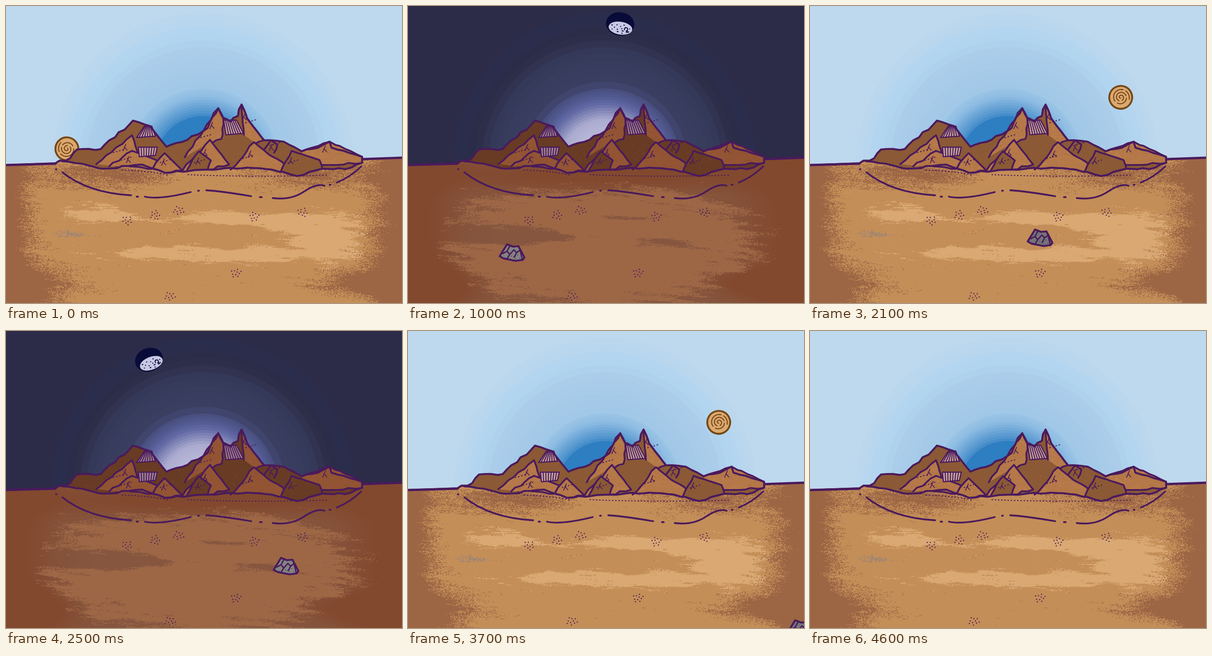
Recreate the animation shown at these times as an HTML page with a canvas. Size 864 by 648 pixels, loop 4.7 s.

```html
<!DOCTYPE html>
<html lang="en">
<head>
<meta charset="utf-8">
<title>Desert days</title>
<style>
html, body { margin: 0; width: 100%; height: 100%; overflow: hidden; background: #bed8ee; }
canvas { display: block; width: 864px; height: 648px; }
</style>
</head>
<body>
<canvas id="stage" width="864" height="648"></canvas>
<script>
const W = 864, H = 648, TAU = Math.PI * 2;
const INK = '#4a1a5c';
const ctx = document.getElementById('stage').getContext('2d');

// Skyline and foot of the range, as key points
const SKYLINE = '108 343 140 332 155 313 207 312 277 250 314 262 350 307 396 292 440 266 463 223 474 244 490 252 506 240 514 215 526 245 563 293 606 296 645 317 690 304 706 296 710 309 777 329';
const FOOT = '777 342 740 356 690 355 635 371 580 357 515 354 440 357 347 364 297 346 212 355 165 344 123 339';

// Faces from back to front; the second point of each is its peak
const LIT = [
  '390 330 463 223 474 245 470 290 440 300',
  '519 281 514 215 526 245 563 293 545 300',
  '645 317 706 296 777 329 777 342 690 347 650 330',
  '197 345 275 282 291 330 240 350',
  '225 350 275 316 330 337 320 355 270 350',
  '320 355 346 321 385 359 347 364',
  '385 359 445 292 487 346 440 357',
  '490 357 541 297 575 325 602 340 635 371 580 357 515 354'
];
const SHADED = ['395 358 421 317 447 337 440 357', '600 360 623 316 684 336 690 355 635 371', '564 312 578 293 592 302 585 320'];

// Pale cliffs: top left, top right, top y, bottom left, bottom right, bottom y
const CLIFFS = [[302, 318, 262, 285, 326, 287], [289, 330, 308, 291, 326, 329], [475, 503, 249, 480, 518, 281]];

const LOOK = {
  day: {
    bands: [[345, 0xbed8ee], [284, 0xb1d4ef], [253, 0xabcdea], [175, 0xa1c8e7], [150, 0x8dbbe2], [112, 0x4a90cb], [105, 0x2e7ec2]],
    low: 0x9c6645, mid: 0xc48e58, high: 0xd9a873,
    face: '#b57848', shade: '#8b5935', cliff: '#c7a59a', flecks: ['#ca955f', '#9b633d'], rock: '#757478',
    edge: 55,
    light: [[200, 455, 85, 22], [330, 538, 150, 15], [540, 545, 110, 16], [480, 462, 120, 16], [700, 520, 85, 42], [660, 470, 120, 22]]
  },
  night: {
    bands: [[345, 0x2c2b48], [322, 0x2b2e4e], [292, 0x2b2b46], [252, 0x363a5a], [190, 0x3a3e61], [150, 0x525a92], [135, 0x6269a4], [100, 0xaaabcf], [35, 0xc6c6e2]],
    low: 0x82492f, mid: 0x86563f, high: 0x9d6746,
    face: '#925433', shade: '#683b25', cliff: '#9e8190', flecks: ['#9b603c', '#7e472e'], rock: '#838381',
    edge: 100,
    light: [[430, 520, 340, 125, 1.25], [270, 500, 150, 20, -1.2], [550, 518, 90, 18, -1], [460, 462, 100, 9, -.7]]
  }
};

const rgb = hex => [hex >> 16, hex >> 8 & 255, hex & 255];
const lerp = (a, b, k) => a + (b - a) * k;
const mix = (a, b, k) => a.map((v, i) => lerp(v, b[i], k));
const bell = v => Math.exp(-v * v);

function hash(x, y) {
  let h = Math.imul(x, 374761393) ^ Math.imul(y, 668265263);
  h = Math.imul(h ^ (h >>> 13), 1274126177);
  return ((h ^ (h >>> 16)) >>> 0) / 4294967296;
}

function noise(x, y) {
  const ix = Math.floor(x), iy = Math.floor(y);
  const ease = v => v * v * (3 - 2 * v);
  const u = ease(x - ix);
  const row = j => lerp(hash(ix, j), hash(ix + 1, j), u);
  return lerp(row(iy), row(iy + 1), ease(y - iy));
}

function layer() {
  const c = document.createElement('canvas');
  c.width = W;
  c.height = H;
  return [c, c.getContext('2d')];
}

function line(g, path, width, color = INK) {
  g.lineWidth = width;
  g.strokeStyle = color;
  g.stroke(new Path2D(path));
}

function disc(g, x, y, rx, ry, color) {
  g.fillStyle = color;
  g.beginPath();
  g.ellipse(x, y, rx, ry, 0, 0, TAU);
  g.fill();
}

function points(text) {
  const n = text.split(' ').map(Number);
  return n.filter((_, i) => i % 2 === 0).map((x, i) => [x, n[i * 2 + 1]]);
}

// Joins key points with a slightly uneven, hand-drawn line
function rough(text) {
  const pts = points(text);
  let path = `${pts[0]}`;
  for (let i = 1; i < pts.length; i++) {
    const [x0, y0] = pts[i - 1], [x1, y1] = pts[i];
    const steps = Math.ceil(Math.hypot(x1 - x0, y1 - y0) / 15);
    for (let s = 1; s <= steps; s++) {
      const k = s / steps, x = lerp(x0, x1, k), y = lerp(y0, y1, k);
      const sway = s < steps ? (hash(x | 0, y | 0) - .5) * 4 : 0;
      path += ` ${x + sway} ${y + sway}`;
    }
  }
  return path;
}

function makeSky({ bands }) {
  const [c, g] = layer();
  g.fillStyle = `rgb(${rgb(bands[0][1])})`;
  g.fillRect(0, 0, W, H);
  for (let r = 345; r > 30; r -= r > 165 ? 15 : 6) {
    const i = bands.findIndex(b => b[0] < r);
    const [r0, c0] = bands[Math.max(0, i - 1)], [r1, c1] = bands.at(i);
    const color = i < 0 ? rgb(c1) : mix(rgb(c0), rgb(c1), (r0 - r) / (r0 - r1));
    disc(g, 430, 345, r, r, `rgb(${color.map(Math.round)})`);
  }
  return c;
}

// Dark soil gathers at the sides, in the low corners and below the range
function darkness(x, y, edge, night) {
  const sides = bell(x / edge) + bell((W - x) / edge / 1.3);
  const corners = bell((x - 40) / 115) * bell((y - 612) / 45) + bell((x - 790) / 125) * bell((y - 605) / 28);
  const patches = night ? 1 : .5 + .5 * Math.cos((x - 195) / 490 * TAU);
  return sides + corners + patches * bell((y - 368) / 34) * bell((x - 432) / 420);
}

function lightness(blobs, x, y) {
  return blobs.reduce((sum, [bx, by, rx, ry, w = 1]) => sum + w * bell((x - bx) / rx) * bell((y - by) / ry), 0);
}

function makeSoil(look, night) {
  const [c, g] = layer();
  const img = g.createImageData(W, H);
  const low = rgb(look.low), mid = rgb(look.mid), high = rgb(look.high), gray = [146, 130, 124];
  for (let y = 315; y < H; y++) {
    for (let x = 0; x < W; x++) {
      const streak = noise(x / 75 + y / 60, y / 8 - x / 70) * .6 + noise(x / 17, y / 2.4) * .4 - .5;
      const grain = hash(x >> 1, y + 977) - .5;
      const d = darkness(x, y, look.edge, night), l = lightness(look.light, x, y);
      let color = mid;
      if (night) {
        color = l - d * .4 + streak * .75 + grain * .3 > .36 ? high : mix(mid, low, Math.min(1, d * 1.2));
      } else if (d + streak * .6 + grain * .65 > .5) color = low;
      else if (l + streak * 1.1 + grain * .25 > .53) color = high;
      const speck = bell((x - 138) / 45) * bell((y - 497) / 9);
      if (!night && speck * .6 + streak * .6 + grain * .7 > .6) color = gray;
      img.data.set([...color, 255], (y * W + x) * 4);
    }
  }
  g.putImageData(img, 0, 0);
  return c;
}

// Fills a rock face and scatters short horizontal flecks over it
function face(g, path, color, flecks) {
  const p = new Path2D(path);
  g.fillStyle = color;
  g.fill(p);
  g.save();
  g.clip(p);
  g.globalAlpha = .45;
  for (let i = 0; i < 2400; i++) {
    const x = 110 + hash(i, 1) * 670, y = 215 + hash(i, 2) * 157;
    g.fillStyle = flecks[noise(x / 45, y / 14) > .47 ? 0 : 1];
    g.fillRect(x, y, 1 + hash(i, 3) * 5, 1);
  }
  g.restore();
}

function peak(g, text, color, flecks) {
  const path = `M${rough(text)}`;
  face(g, path + 'Z', color, flecks);
  line(g, path, 3.8);
  const [[lx, ly], [ax, ay]] = points(text);
  const x = lerp(ax, lx, .25), y = lerp(ay, ly, .25);
  line(g, `M${x + 6} ${y + 4}l-6 14M${x + 3} ${y + 10}l6 7`, 1.8);
  g.setLineDash([1.5, 5.5]);
  line(g, `M${lerp(ax, lx, .6) + 6} ${lerp(ay, ly, .6)}l24 -7`, 2.1);
  g.setLineDash([]);
}

function cliff(g, [tl, tr, ty, bl, br, by], color) {
  const shape = `M${tl} ${ty}L${tr} ${ty} ${br} ${by - 3} ${bl} ${by}Z`;
  g.fillStyle = color;
  g.fill(new Path2D(shape));
  line(g, shape, 2.6);
  for (let k = 1 / 7; k < .99; k += 1 / 7) {
    line(g, `M${lerp(tl, tr, k)} ${ty}L${lerp(bl, br, k)} ${by - 2}`, 2.2);
  }
}

function makeLand(look, night) {
  const [c, g] = layer();
  const skyline = rough(SKYLINE), foot = rough(FOOT);
  g.lineCap = g.lineJoin = 'round';
  g.save();
  g.clip(new Path2D(`M0 347L${skyline} 779 334 864 331 864 648 0 648Z`));
  g.drawImage(makeSoil(look, night), 0, 0);
  g.restore();

  face(g, `M${skyline}L${foot}Z`, look.shade, [look.shade, look.flecks[1]]);
  for (const p of LIT) peak(g, p, look.face, look.flecks);
  for (const p of SHADED) peak(g, p, look.shade, [look.shade, look.flecks[1]]);
  for (const p of CLIFFS) cliff(g, p, look.cliff);

  line(g, `M0 347L${skyline} L${foot}`, 4.2);
  line(g, 'M0 347L108 344M779 334L864 331', 5);
  line(g, 'M123 363Q180 408 273 413M303 416Q335 423 403 406M437 402Q470 404 535 415M582 419Q622 424 650 405T695 392M722 385Q750 374 775 350', 3.8);
  line(g, 'M109 356h1M285 416h3M419 403h2M554 417h4M706 390h2', 3.8);
  g.setLineDash([1.5, 5.5]);
  line(g, 'M253 358Q305 359 355 369M397 368Q540 374 703 369', 2.1);
  g.setLineDash([]);

  for (const [x, y] of points('265 468 325 456 377 446 542 460 648 450 502 582 358 633')) {
    for (let i = 0; i < 10; i++) {
      const a = i * 2.4 + x, r = 3.9 * Math.sqrt(i + .6);
      disc(g, x + Math.cos(a) * r, y + Math.sin(a) * r * .85, 1.3, 1.3, INK);
    }
  }
  return c;
}

// Moves the context to the tilted arc followed by both sun and moon
function orbit(degrees, rx, ry) {
  const a = degrees * Math.PI / 180, x = rx * Math.sin(a);
  ctx.translate(418 + x, 338 - ry * Math.cos(a) - .05 * x);
  ctx.rotate(a);
}

function drawSun(step) {
  ctx.save();
  orbit(-82 + 29.3 * step, 288, 292);
  disc(ctx, 0, 0, 25, 25, '#dba870');
  ctx.strokeStyle = '#754713';
  ctx.lineWidth = 4;
  ctx.stroke();
  ctx.lineWidth = 2.2;
  ctx.setLineDash([28, 5, 42, 4]);
  ctx.beginPath();
  for (let t = 0; t < 18; t += .2) ctx.lineTo(Math.cos(t) * (1 + t), Math.sin(t) * (1 + t));
  ctx.stroke();
  ctx.restore();
}

function drawMoon(step) {
  const dark = '#090b38';
  ctx.save();
  orbit(-79.3 + 29.3 * step, 300, 300);
  disc(ctx, 0, 0, 31, 25.5, dark);
  disc(ctx, 2, 9, 26, 14, '#c7c8e5');
  for (let i = 0; i < 14; i++) {
    const t = i * 2.4, r = Math.sqrt((i + .5) / 14);
    disc(ctx, 1 + Math.cos(t) * r * 22, 10 + Math.sin(t) * r * 11, 1 + hash(i, 5) * 1.5, 1.2, dark);
  }
  line(ctx, 'M12 12a3.5 3.5 0 1 1 5 0Q13 19 22 14', 2, dark);
  ctx.restore();
}

// Rock waypoints: tick, x, y
const TRAIL = [[1, 2, 676], [10, 227, 538], [14, 311, 493], [25, 611, 513], [30, 729, 513], [39, 892, 688]];

function drawRock(tick, color) {
  const i = TRAIL.findIndex(p => p[0] > tick);
  if (i < 1) return;
  const [t0, x0, y0] = TRAIL[i - 1], [t1, x1, y1] = TRAIL[i];
  const k = (tick - t0) / (t1 - t0);
  ctx.save();
  ctx.translate(lerp(x0, x1, k), lerp(y0, y1, k));
  ctx.lineCap = ctx.lineJoin = 'round';
  const edge = 'M-27 8L-11 -18 2 -13 14 -14 27 11 23 16 8 18 -18 13Z';
  ctx.fillStyle = color;
  ctx.fill(new Path2D(edge));
  line(ctx, edge, 4.2);
  line(ctx, 'M-20 2L-11 -3 -5 4 4 -6 10 0 17 -5M-11 -3L-5 -14M-5 4L-10 12M10 0L5 10M18 -3L22 14', 2.8);
  for (let n = 0; n < 8; n++) disc(ctx, -15 + n * 4.6, 5 + hash(n, 8) * 8, .9, .9, INK);
  ctx.restore();
}

const scenes = {};
for (const name in LOOK) {
  scenes[name] = { sky: makeSky(LOOK[name]), land: makeLand(LOOK[name], name === 'night') };
}

const TICK = 100, TICKS = 47, CYCLE = 16;

function draw(ms) {
  const tick = Math.floor(ms / TICK) % TICKS;
  const hour = tick % CYCLE;
  const name = hour >= 6 && hour < 14 ? 'night' : 'day';
  ctx.drawImage(scenes[name].sky, 0, 0);
  if (hour < 6) drawSun(hour);
  if (hour >= 7 && hour <= 12) drawMoon(hour - 7);
  ctx.drawImage(scenes[name].land, 0, 0);
  drawRock(tick, LOOK[name].rock);
}

const start = performance.now();
function loop() {
  draw(performance.now() - start);
  requestAnimationFrame(loop);
}
loop();
</script>
</body>
</html>
```
